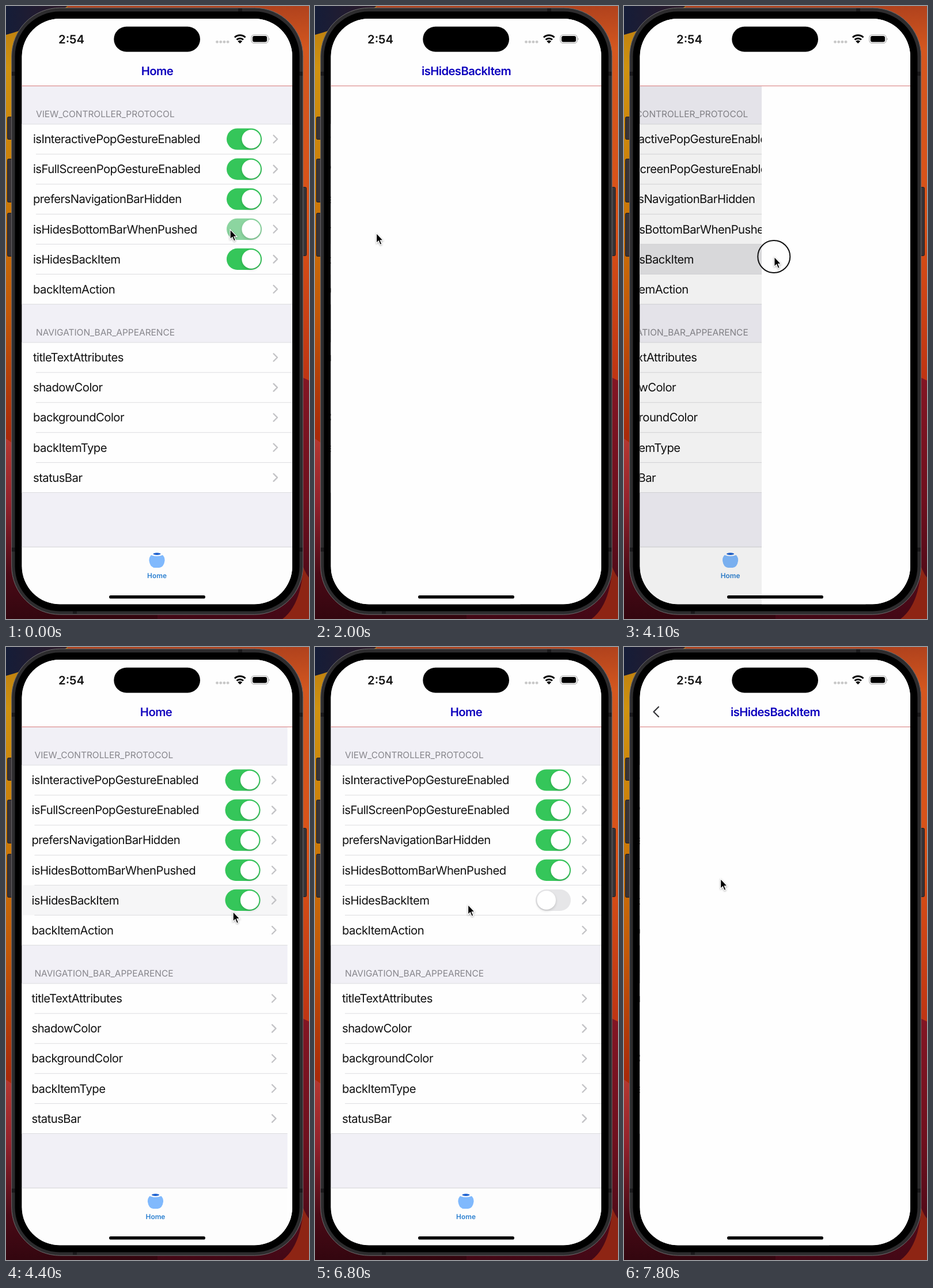
An HTML page that plays this animation: 526 by 1064 pixels, repeating every 8000 ms.

```html
<!DOCTYPE html>
<html lang="en">
<head>
<meta charset="utf-8">
<title>Navigation demo</title>
<style>
html, body { margin: 0; width: 100%; height: 100%; overflow: hidden; background: #000; }
svg { display: block; width: 526px; height: 1064px; }
text { font-family: Inter, sans-serif; font-optical-sizing: none; text-rendering: geometricPrecision; fill: #111; }
.row { font-size: 20.3px; letter-spacing: -.55px; }
.head { font-size: 15.5px; letter-spacing: -.04px; fill: #87868c; }
.title { font-size: 20.3px; font-weight: 600; letter-spacing: -.6px; fill: #0d00bd; text-anchor: middle; }
.clock { font-size: 20.3px; font-weight: 600; }
.tab { font-size: 11.9px; font-weight: 600; fill: #2a7fd0; text-anchor: middle; }
.chevron { fill: none; stroke: #c3c3c6; stroke-width: 2.3; stroke-linecap: round; stroke-linejoin: round; }
.knob { fill: #fff; filter: drop-shadow(0 2px 2px rgba(0,0,0,.16)); }
#pointer { filter: drop-shadow(0 1.5px 1.5px rgba(0,0,0,.35)); }
</style>
</head>
<body>
<svg viewBox="0 0 526 1064">
  <defs>
    <linearGradient id="left" x2="0" y2="1">
      <stop offset="0" stop-color="#b8780f"/><stop offset=".1" stop-color="#cf920f"/>
      <stop offset=".3" stop-color="#cb7d09"/><stop offset=".5" stop-color="#c35808"/>
      <stop offset=".7" stop-color="#a92a0a"/>
    </linearGradient>
    <linearGradient id="lowLeft" x2="0" y2="1">
      <stop offset="0" stop-color="#b53831"/><stop offset=".35" stop-color="#93222c"/>
      <stop offset=".75" stop-color="#4a0a16"/><stop offset="1" stop-color="#33060f"/>
    </linearGradient>
    <linearGradient id="right" x2="0" y2="1">
      <stop offset="0" stop-color="#b0421d"/><stop offset=".07" stop-color="#d4571f"/>
      <stop offset=".35" stop-color="#d95218"/><stop offset=".6" stop-color="#c03613"/>
    </linearGradient>
    <linearGradient id="lowRight" x2="0" y2="1">
      <stop offset="0" stop-color="#841624"/><stop offset=".5" stop-color="#70101e"/>
      <stop offset="1" stop-color="#430816"/>
    </linearGradient>
    <linearGradient id="night" x2="1">
      <stop offset="0" stop-color="#151d38"/><stop offset="1" stop-color="#2e1a28"/>
    </linearGradient>
    <clipPath id="screen"><rect x="27.6" y="22" width="469.4" height="1016.3" rx="66"/></clipPath>
  </defs>

  <rect width="526" height="1064" fill="url(#right)"/>
  <rect width="107" height="1064" fill="url(#left)"/>
  <path d="M0 0H107Q60 34 0 50Z" fill="url(#night)"/>
  <path d="M0 751Q40 775 90 900L263 1000V1064H0Z" fill="url(#lowLeft)"/>
  <path d="M526 650L505 640V1000L263 1040V1064H526Z" fill="url(#lowRight)"/>
  <path d="M516 974Q522 988 526 992V1064H480Q512 1040 516 974Z" fill="#8e2514"/>

  <g fill="#393437" stroke="#201c1e">
    <rect x="2.5" y="192.5" width="10" height="39" rx="2"/>
    <rect x="2.5" y="265.5" width="10" height="75" rx="2"/>
    <rect x="2.5" y="359.5" width="10" height="75" rx="2"/>
    <rect x="512" y="314.5" width="9.5" height="119" rx="2"/>
  </g>
  <rect x="9.7" y="3.2" width="506" height="1053" rx="84" fill="#2d2c2e" stroke="#6d6b6d"/>
  <path d="M403 4h7v6h-7zM10 114h6v7h-6zM509 114h6v7h-6zM10 940h6v7h-6zM509 940h6v7h-6zM116 1049h7v6h-7z" fill="#1b1a1c"/>
  <rect x="15.5" y="9.5" width="494" height="1041" rx="78" fill="#000"/>

  <g clip-path="url(#screen)">
    <rect x="27" y="22" width="470" height="1017" fill="#fefefe"/>
    <g id="home">
      <rect x="27" y="139" width="470" height="800" fill="#f1f0f6"/>
      <g id="list"></g>
      <rect x="27" y="939" width="470" height="100" fill="#fdfdfd"/>
      <path d="M27 939H497" stroke="#d2d2d5"/>
      <path d="M252 953Q262 957 272 953Q276 957 275.5 963Q274 974 266 975H258Q250 974 248.5 963Q248 957 252 953Z" fill="#80b9fd"/>
      <ellipse cx="262" cy="951" rx="6.5" ry="1.9" fill="#1f62cf"/>
      <text class="tab" x="262" y="993">Home</text>
      <rect id="dim" x="27" y="139" width="620" height="900"/>
    </g>
    <rect id="page" x="28" y="139" width="469" height="900" fill="#fefefe"/>
    <rect x="27" y="22" width="470" height="117" fill="#fefefe"/>
    <path d="M27 138.7H497" stroke="#dd8f8f" stroke-width="1.2"/>
    <text class="title" id="homeTitle" y="120">Home</text>
    <text class="title" id="pageTitle" y="120">isHidesBackItem</text>
    <path id="back" d="M60 104L51.5 112.5L60 121" class="chevron" style="stroke:#37373b"/>
  </g>

  <text class="clock" x="91" y="64.8">2:54</text>
  <rect x="187.3" y="35.8" width="149.7" height="43.7" rx="21.8"/>
  <g fill="#c8c8c8">
    <circle cx="366.5" cy="62.3" r="2.4"/><circle cx="372.7" cy="62.3" r="2.4"/>
    <circle cx="378.9" cy="62.3" r="2.4"/><circle cx="385.1" cy="62.3" r="2.4"/>
  </g>
  <path d="M397 54.5A13.5 13.5 0 0 1 415.5 54.5M400.5 58.5A8.3 8.3 0 0 1 412 58.5" fill="none" stroke="#000" stroke-width="3"/>
  <path d="M406.2 65L402.3 61.2A5.6 5.6 0 0 1 410.1 61.2Z"/>
  <rect x="426" y="50" width="29" height="14.5" rx="4.6" fill="none" stroke="#a5a5a5" stroke-width="1.2"/>
  <rect x="428" y="52" width="25" height="10.5" rx="3"/>
  <path d="M456.5 55Q459 57.3 456.5 59.6Z" fill="#a5a5a5"/>
  <rect x="179" y="1023" width="167" height="5.6" rx="2.8"/>

  <circle id="touch" r="28" fill="none" stroke="#111" stroke-width="2"/>
  <path id="pointer" d="M.6 .4V17.5L4.4 13.8L7.2 20.4L10 19.2L7.3 12.8H12.4Z" stroke="#fff" stroke-width="1.2"/>
</svg>
<script>
const $ = id => document.getElementById(id);
const LOOP = 8000, STEP = 100, WIDTH = 469, ROW = 52.1;

const sections = [
  { top: 205, head: 'VIEW_CONTROLLER_PROTOCOL', switches: 5,
    rows: ['isInteractivePopGestureEnabled', 'isFullScreenPopGestureEnabled', 'prefersNavigationBarHidden',
           'isHidesBottomBarWhenPushed', 'isHidesBackItem', 'backItemAction'] },
  { top: 584, head: 'NAVIGATION_BAR_APPEARENCE', switches: 0,
    rows: ['titleTextAttributes', 'shadowColor', 'backgroundColor', 'backItemType', 'statusBar'] }
];

const track = (cls, y, color) =>
  `<rect class="${cls}" x="383" y="${y - 18.6}" width="61" height="37.2" rx="18.6" fill="${color}"/>`;

const toggle = (id, y) => `<g id="${id}">${track('off', y, '#e6e6e8')}${track('on', y, '#35c65a')}
  <circle class="knob" cy="${y}" r="16.3" cx="425.7"/></g>`;

const line = (x, y) => `<path d="M${x} ${y}H497" stroke="#dcdcdf"/>`;

function section({ top, head, switches, rows }) {
  const height = rows.length * ROW;
  let out = `<text class="head" x="52" y="${top - 12.5}">${head}</text>
    <rect x="27" y="${top}" width="470" height="${height}" fill="#fefefe"/>`;
  rows.forEach((name, i) => {
    const y = top + i * ROW, mid = y + 26;
    if (name === 'isHidesBackItem')
      out += `<rect id="selected" x="27" y="${y}" width="470" height="${ROW}" fill="#e5e5e7"/>`;
    out += line(i ? 52 : 27, y) + `<text class="row" x="47" y="${mid + 7.2}">${name}</text>
      <path class="chevron" d="M464.5 ${mid - 6.5}L471 ${mid}L464.5 ${mid + 6.5}"/>`;
    if (i < switches) out += toggle('switch' + i, mid);
  });
  return out + line(27, top + height);
}
$('list').innerHTML = sections.map(section).join('');

const clamp = v => Math.max(0, Math.min(1, v));
const smooth = v => v * v * (3 - 2 * v);
const settle = v => 1 - (1 - v) ** 3;

// Interpolates rows of [time, ...values].
function sample(keys, t, ease = smooth) {
  const i = keys.findIndex(k => k[0] > t);
  if (i < 0) return keys[keys.length - 1].slice(1);
  if (!i) return keys[0].slice(1);
  const a = keys[i - 1], b = keys[i], f = ease((t - a[0]) / (b[0] - a[0]));
  return a.slice(1).map((v, j) => v + (b[j + 1] - v) * f);
}

const path = [
  [0, 388.5, 387.5], [200, 388, 388], [700, 264, 446], [1100, 262, 446], [2000, 106, 394],
  [2600, 66, 368], [3400, 62, 356], [3600, 49, 364], [4100, 260.3, 435], [4300, 385, 458],
  [4600, 418, 462], [5500, 416, 458], [5900, 412, 444], [6200, 412, 444], [6800, 265, 447],
  [7100, 262, 446], [7800, 167, 402]
];
// Share of the detail page on screen.
const cover = [[900, 0], [1400, 1], [3600, 1], [4100, .55], [4250, .28], [4500, 0], [7000, 0], [7500, 1]];
const presses = [[800, 900], [3300, 4300], [5900, 6000], [6900, 7000]];

function setSwitch(i, fill, knob) {
  const el = $('switch' + i);
  el.querySelector('.on').setAttribute('opacity', fill);
  el.querySelector('.knob').setAttribute('cx', 401.7 + 24 * knob);
}

const shift = (id, x, y = 0) => $(id).setAttribute('transform', `translate(${x} ${y})`);
const fade = (id, v) => $(id).setAttribute('opacity', v);

function draw(t) {
  const dragging = t >= 3600 && t < 4250;
  const [q] = sample(cover, t, dragging ? smooth : settle);
  shift('home', -.3 * WIDTH * q);
  shift('page', WIDTH * (1 - q));
  fade('dim', .1 * q);
  shift('homeTitle', 262.5 - 110 * q);
  fade('homeTitle', clamp(1 - 2 * q));
  shift('pageTitle', 262.5 + 200 * (1 - q));
  fade('pageTitle', clamp((q - .6) / .4));
  fade('back', t > 6900 ? clamp((q - .4) / .6) : 0);

  const picked = t >= 6900 || t >= 800 && t < 4500;
  fade('selected', !picked ? 0 : t < 4500 ? clamp((4500 - t) / 300) : 1);

  const turnedOff = clamp((t - 6000) / 300);
  setSwitch(3, clamp(.5 + t / 300), 1);
  setSwitch(4, 1 - turnedOff, 1 - settle(turnedOff));

  const [x, y] = sample(path, t);
  shift('pointer', x, y);
  shift('touch', x, y);
  fade('touch', +presses.some(([from, to]) => t >= from && t < to));
}

function tick(now) {
  draw(Math.floor(now % LOOP / STEP) * STEP);
  requestAnimationFrame(tick);
}
draw(0);
requestAnimationFrame(tick);
</script>
</body>
</html>
```
